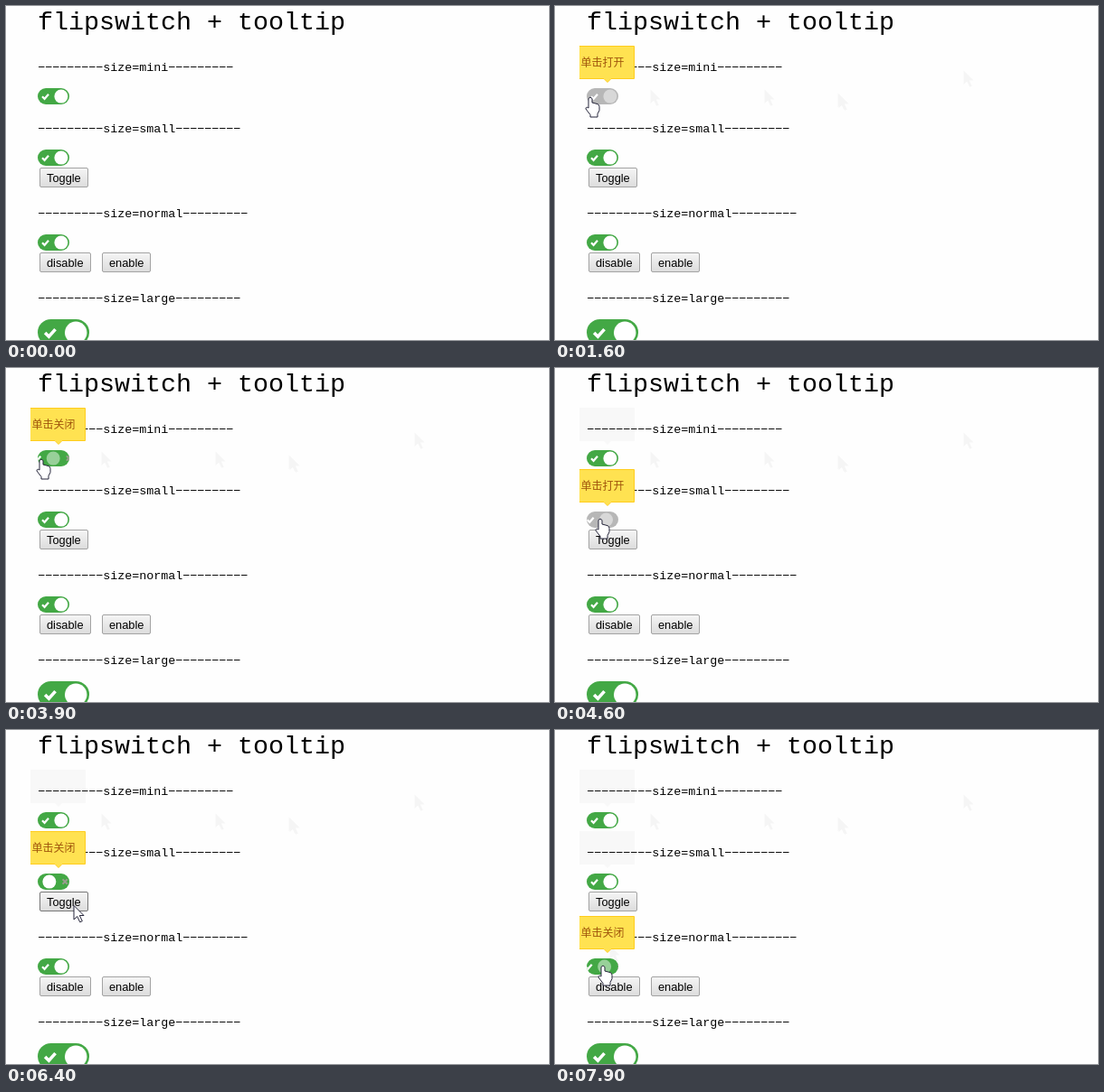
An HTML page for the animation above (8000 ms loop, 600 px wide and 370 px high).

```html
<!DOCTYPE html>
<html lang="en">
<head>
<meta charset="utf-8">
<style>
  html, body { margin: 0; width: 100%; height: 100%; overflow: hidden; background: #fefefe; }
  svg { display: block; }
  .mono { font-family: "Liberation Mono", monospace; white-space: pre; }
  .button { font: 12.8px "Liberation Sans", sans-serif; }
  .tip { font: 12px "Noto Sans CJK SC", "Noto Sans CJK", sans-serif; fill: #a0560c; }
</style>
</head>
<body>
<svg id="stage" width="600" height="370" viewBox="0 0 600 370"></svg>
<script>
const LOOP = 8000, TICK = 100;
const ARROW = 'M.5 .5V16l3.7-3.5 3 6.3 2.6-1.1-3-6.2h4.7z';
const HAND = 'M-2 11V1.5Q0-1.5 2 1.5V6l6 1.6q2 .6 2 3v4l-2 4V22H0v-2.5l-5-6.5q0-3 3-1z';
const CHECK = 'M-3.6.2l2.6 2.6 4.4-5';
const CROSS = 'M-2.6-2.6l5.2 5.2m0-5.2l-5.2 5.2';

// clicks: [time, slide duration]; hover and tip: [from, to]
const switches = [
  { y: 91, clicks: [[1600, 300], [2300, 500], [3000, 400], [3700, 400]], hover: [800, 4200], tip: [900, 4300] },
  { y: 159, clicks: [[4500, 300], [4900, 300], [5500, 400], [6300, 300]], hover: [4200, 5200], tip: [4300, 6800] },
  { y: 253, clicks: [[7200, 300], [7723, 300]], hover: [6800, LOOP], tip: [6900, LOOP] },
  { y: 347, scale: 1.63, clicks: [], hover: [LOOP, LOOP], tip: [LOOP, LOOP] }
];

// [time, x, y, is hand]
const cursorStops = [
  [200, 451, 71], [300, 313, 97], [400, 312, 96], [600, 231, 92], [700, 105, 92],
  [800, 39, 101, true], [4200, 50, 167, true], [5200, 70, 188], [5300, 78.5, 199],
  [6000, 74.5, 194], [6700, 60, 238], [6800, 53, 267, true], [7300, 53, 266, true], [7900, 53, 261, true]
];

const within = (t, [from, to]) => t >= from && t < to;
const swing = p => 0.5 - Math.cos(Math.min(1, p) * Math.PI) / 2;
const text = (cls, x, y, content, extra = '') => `<text class="${cls}" x="${x}" y="${y}" ${extra}>${content}</text>`;
const stroke = (d, x, color, width) =>
  `<path d="${d}" transform="translate(${x} 9)" fill="none" stroke="${color}" stroke-width="${width}"/>`;

function switchState({ clicks }, t) {
  const past = clicks.filter(([time]) => time <= t);
  const on = past.length % 2 === 0;
  if (!past.length) return { on, position: 1 };
  const [time, duration] = past[past.length - 1];
  const p = swing((t - time) / duration);
  return { on, position: on ? p : 1 - p };
}

function drawSwitch(item, t) {
  const { on, position } = switchState(item, t);
  const knob = 8.5 + 17.4 * position;
  return `<g transform="translate(35 ${item.y}) scale(${item.scale || 1})" clip-path="url(#pill)">
    <rect width="35" height="18" fill="${on ? '#43a845' : '#b7b7b7'}"/>
    ${stroke(CHECK, knob - 17.3, '#fff', 2.2)}${stroke(CROSS, knob + 17.3, '#9c9c90', 2)}
    <circle cx="${knob}" cy="9.1" r="7.5" fill="#fff" opacity="${within(t, item.hover) ? 0.45 : 1}"/></g>`;
}

function drawTip(item, t) {
  const top = item.y - 47;
  return `<g transform="translate(27 ${top})">
    <path d="M0 .5H60.5V36.5H35l-4 4-4-4H0" fill="#ffe251" stroke="#ffcc1c"/>
    ${text('tip', 1.5, 22.5, switchState(item, t).on ? '单击关闭' : '单击打开')}</g>`;
}

const tipTrace = ({ y }) => `<path transform="translate(27 ${y - 47})" d="M0 0H61V37H35l-4 4-4-4H0" fill="#f8f8f8"/>`;

const button = (x, y, width, label, hover) =>
  `<rect x="${x + .5}" y="${y + .5}" width="${width - 1}" height="21" rx="1.5" fill="url(#face)" stroke="${hover ? '#777' : '#a3a3a3'}"/>`
  + text('button', x + 8, y + 16, label);

const cursor = ([, x, y, hand]) =>
  `<path d="${hand ? HAND : ARROW}" transform="translate(${x} ${y})" fill="#fff" stroke="#25253a" stroke-linejoin="round"/>`;

const cursorTrace = ([, x, y]) => `<path d="${ARROW}" transform="translate(${x} ${y})" fill="#f5f5f5"/>`;

function draw(t) {
  const stops = cursorStops.filter(([time]) => time <= t);
  const current = stops.pop();
  const sizes = ['mini', 'small', 'normal', 'large'];
  const dashes = '\u2212'.repeat(9);
  return `<defs>
    <clipPath id="pill"><rect width="35" height="18" rx="9"/></clipPath>
    <linearGradient id="face" x2="0" y2="1"><stop stop-color="#f5f5f5"/><stop offset="1" stop-color="#dcdcdc"/></linearGradient>
    </defs>`
    + switches.filter(s => t >= s.tip[1]).map(tipTrace).join('')
    + stops.filter(s => !s[3] && (s[0] < 800 || s[0] === 6700)).map(cursorTrace).join('')
    + text('mono', 35, 26, 'flipswitch + tooltip', 'font-size="28.33"')
    + switches.map((s, i) => text('mono', 35.3, s.y - 19, dashes + 'size=' + sizes[i] + dashes, 'font-size="13.333"')).join('')
    + switches.map(s => drawSwitch(s, t)).join('')
    + button(37, 179, 54, 'Toggle', within(t, [5200, 6700]))
    + button(37, 273, 57, 'disable') + button(106, 273, 54, 'enable')
    + switches.filter(s => within(t, s.tip)).map(s => drawTip(s, t)).join('')
    + (current ? cursor(current) : '');
}

const stage = document.getElementById('stage');
let shown = -1;
function frame() {
  const t = Math.floor(performance.now() % LOOP / TICK) * TICK;
  if (t !== shown) stage.innerHTML = draw(shown = t);
  requestAnimationFrame(frame);
}
frame();
</script>
</body>
</html>
```
